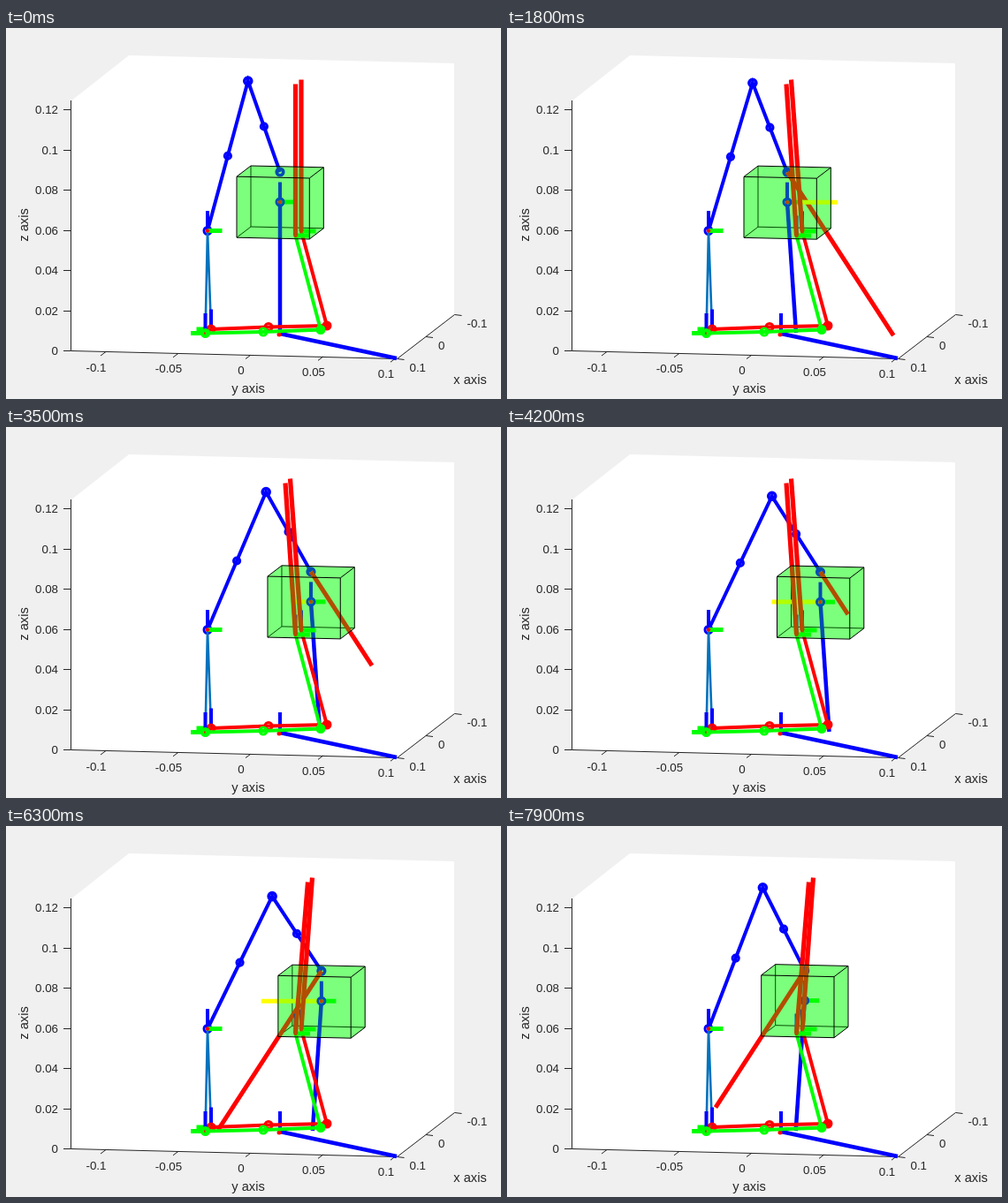
An HTML page with a canvas for the animation above (8 s loop, 560 by 420 pixels).

```html
<!DOCTYPE html>
<html lang="en">
<head>
<meta charset="utf-8">
<title>Linkage simulation</title>
<style>
html, body { margin: 0; width: 100%; height: 100%; overflow: hidden; background: #f0f0f0; }
canvas { display: block; width: 560px; height: 420px; }
</style>
</head>
<body>
<canvas id="stage" width="560" height="420"></canvas>
<script>
const ctx = document.getElementById('stage').getContext('2d');
const BLUE = '#00f', RED = '#f00', GREEN = '#0f0', YELLOW = '#ff0', STEEL = '#0072bd', INK = '#262626';
const ANKLE = [228, 229.5];
const LOOP = 8000, HOLD = 500, STEP = 100, REVERSAL = 48;

// Body position: step, x, speed per step
const BODY = [[0, 310, 0], [14, 317, 1.25], [24, 333, 1.75], [38, 354.5, 1.05],
  [47, 359.8, 0], [50, 359.5, -0.1], [65, 352, -1.1], [75, 336.7, -1.75]];
// Signed lengths of the red pull and the yellow arrow
const PULL = [[0, 0], [1, 148], [6, 185], [21.5, 185], [43.8, 0], [47, -26],
  [48, -146], [53.5, -180], [72, -180], [75, -155]];
const NET = [[0, 0], [8, 70], [14, 57], [24, 17], [38, -55], [46, -75],
  [47, 68], [50, -5], [58, -70], [65, -57], [75, 0]];

function segment(keys, k) {
  let i = 0;
  while (i < keys.length - 2 && k >= keys[i + 1][0]) i++;
  const [a, b] = [keys[i], keys[i + 1]];
  return { a, b, span: b[0] - a[0], u: (k - a[0]) / (b[0] - a[0]) };
}
function linear(keys, k) {
  const { a, b, u } = segment(keys, k);
  return a[1] + (b[1] - a[1]) * u;
}
function hermite(keys, k) {
  const { a, b, span, u } = segment(keys, k), w = 1 - u;
  return w * w * (1 + 2 * u) * a[1] + u * u * (3 - 2 * u) * b[1]
    + span * u * w * (w * a[2] - u * b[2]);
}

function path(points, closed) {
  ctx.beginPath();
  points.forEach(p => ctx.lineTo(...p));
  if (closed) ctx.closePath();
}
function line(color, width, ...points) {
  path(points);
  ctx.strokeStyle = color;
  ctx.lineWidth = width;
  ctx.stroke();
}
function fill(color, points) {
  path(points, true);
  ctx.fillStyle = color;
  ctx.fill();
}
function ring(color, [x, y], r = 4, width = 3) {
  ctx.beginPath();
  ctx.arc(x, y, r, 0, 2 * Math.PI);
  ctx.strokeStyle = color;
  ctx.lineWidth = width;
  ctx.stroke();
}
function dot(color, [x, y], r) {
  ctx.beginPath();
  ctx.arc(x, y, r, 0, 2 * Math.PI);
  ctx.fillStyle = color;
  ctx.fill();
}
function text(value, x, y, align, size = 13.33) {
  ctx.font = `${size}px "Liberation Sans", Arial, sans-serif`;
  ctx.textAlign = align;
  ctx.fillStyle = INK;
  ctx.fillText(value, x, y);
}
const middle = (p, q) => [(p[0] + q[0]) / 2, (p[1] + q[1]) / 2];

// Small coordinate frame: blue up, green sideways, red towards the viewer
function triad([x, y], side = 1) {
  line(BLUE, 4, [x, y], [x, y - 22.5]);
  line(GREEN, 5, [x, y], [x + 16.5 * side, y]);
  dot(RED, [x, y], 2.2);
}

function drawAxes() {
  ctx.fillStyle = '#f0f0f0';
  ctx.fillRect(0, 0, 560, 420);
  fill('#fff', [[73, 83], [139, 31], [507, 40], [507, 324], [442, 374], [73, 366]]);
  line(INK, 1, [73.5, 82], [73.5, 365.5], [442.5, 374.5], [507.5, 324.5]);
  ['0', '0.02', '0.04', '0.06', '0.08', '0.1', '0.12'].forEach((label, i) => {
    const y = Math.round(365 - 45.5 * i) + 0.5;
    line(INK, 1, [73.5, y], [65, y]);
    text(label, 59, y + 4.5, 'right');
  });
  ['-0.1', '-0.05', '0', '0.05', '0.1'].forEach((label, i) => {
    const x = 113 + 82 * i, y = 366.5 + 1.8 * i;
    line(INK, 1, [x, y], [x - 6, y + 4.5]);
    text(label, x - 11, y + 22, 'center');
  });
  ['0.1', '0', '-0.1'].forEach((label, i) => {
    const x = 442.5 + 32.5 * i, y = 374.5 - 25 * i;
    line(INK, 1, [x, y], [x + 8, y + 1]);
    text(label, x + 14, y + 14.5, 'left');
  });
  text('y axis', 274, 413, 'center', 14.67);
  text('x axis', 525, 403, 'center', 14.67);
  ctx.save();
  ctx.translate(25, 223);
  ctx.rotate(-Math.PI / 2);
  text('z axis', 0, 0, 'center', 14.67);
  ctx.restore();
}

// Knee from two link lengths; the horizontal scale is smaller than the vertical one
function kneeOf(hip) {
  const scale = 0.721, upper = 181, lower = 114.6;
  const dx = (hip[0] - ANKLE[0]) / scale, dy = hip[1] - ANKLE[1];
  const d = Math.hypot(dx, dy);
  const along = (upper ** 2 - lower ** 2 + d * d) / (2 * d);
  const off = Math.sqrt(upper ** 2 - along ** 2);
  return [ANKLE[0] + scale * (along * dx + off * dy) / d, ANKLE[1] + (along * dy - off * dx) / d];
}

function drawGround() {
  line(BLUE, 4.5, [310, 346], [442, 374]);
  line(BLUE, 4, [310, 346], [310, 323]);
  dot(RED, [309, 347], 2.5);
}

function drawFeet(lean) {
  const rightBack = [334, 230], rightFront = [327.5, 235];
  const heelBack = [232, 341], heelFront = [225.5, 345.5];
  line(STEEL, 2.6, heelFront, ANKLE, heelBack);
  triad(ANKLE);
  triad(heelBack, -1);
  line(RED, 4, heelBack, [297, 338.5], [363, 337], rightBack);
  ring(RED, heelBack);
  ring(RED, [297, 338.5]);
  ring(RED, [363, 337], 3.5, 4);
  triad(heelFront, -1);
  line(GREEN, 4, heelFront, [291, 344], [356, 341.5], rightFront);
  ring(GREEN, [291, 344]);
  [heelFront, [356, 341.5]].forEach(p => ring(GREEN, p, 3.5, 4));
  triad(rightBack);
  triad(rightFront);
  line(RED, 5.2, rightBack, [334 - 12.5 * lean, 58.5]);
  line(RED, 5.2, rightFront, [327.5 - (lean > 0 ? 11.5 : 14) * lean, 63.5]);
}

function drawBody(k, x, lean) {
  const drop = (x - 310) * 0.025;
  const hip = [x, 163 + drop], core = [x, 197 + drop], knee = kneeOf(hip);
  const pull = linear(PULL, k), net = linear(NET, k);
  line(BLUE, 4.5, core, [x + 10 * lean, 345]);
  line(BLUE, 4, ANKLE, knee, hip);
  ring(BLUE, ANKLE);
  ring(BLUE, middle(ANKLE, knee), 3.6);
  ring(BLUE, middle(knee, hip), 3.6);
  ring(BLUE, knee, 4, 3.6);
  ring(BLUE, hip, 3.8, 3.6);
  if (pull) line(RED, 5, hip, [x + 0.65 * pull, hip[1] + Math.abs(pull)]);
  if (net) line(YELLOW, 5, core, [x + net, core[1]]);
  triad(core);
  ring(BLUE, core);
}

function boxCorners(x) {
  const d = (x - 310) * 0.025;
  const face = (left, top) => [[x + left, top + d], [x + left + 82.3, top + 1.8 + d],
    [x + left + 82.3, top + 70.8 + d], [x + left, top + 69 + d]];
  return { front: face(-49, 168.2), back: face(-33, 156) };
}
function drawEdges(points) {
  line('#000', 1, ...points);
}

function draw(k) {
  const x = hermite(BODY, k);
  const lean = k === 0 ? 0 : k < REVERSAL ? 1 : -1;
  const { front, back } = boxCorners(x);
  const outline = [front[0], back[0], back[1], back[2], front[2], front[3]];
  const veil = 'rgba(0,255,0,0.3)';

  drawAxes();
  fill(veil, outline);
  drawEdges([back[0], back[3], back[2]]);
  drawEdges([back[3], front[3]]);
  drawGround();
  drawBody(k, x, lean);
  drawFeet(lean);
  fill(veil, outline);
  drawEdges([...outline, front[0], front[1], front[2]]);
  drawEdges([front[1], back[1]]);
}

function tick() {
  const t = performance.now() % LOOP;
  draw(t < HOLD ? 0 : Math.floor((t - HOLD) / STEP) + 1);
  requestAnimationFrame(tick);
}
tick();
</script>
</body>
</html>
```
